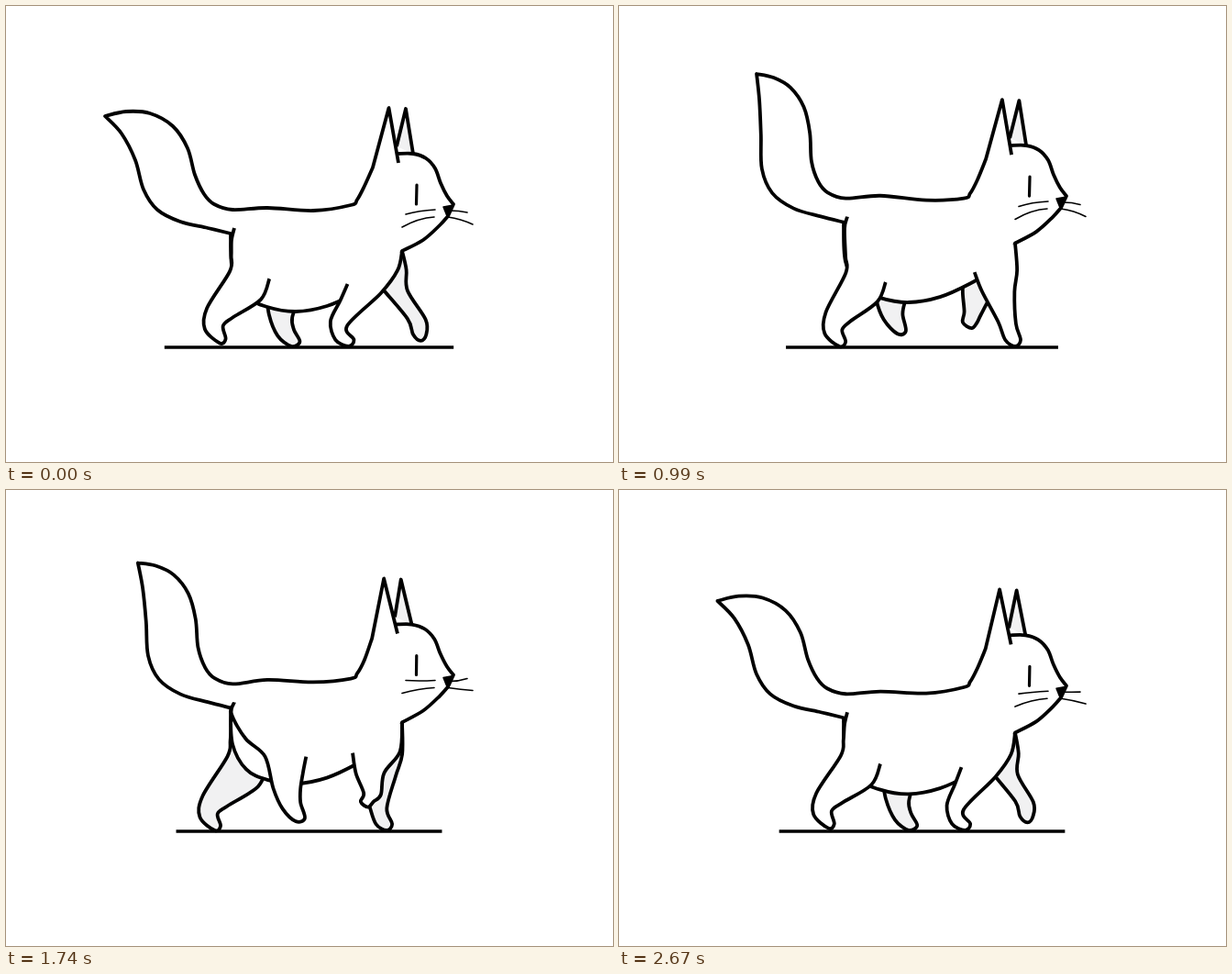
These frames come from a looping animation (662x497 px, 2700 ms). An HTML page with a canvas:

```html
<!DOCTYPE html>
<html lang="en">
<head>
<meta charset="utf-8">
<title>Walking cat</title>
<style>
html, body { margin: 0; width: 100%; height: 100%; overflow: hidden; background: #fff; }
canvas { display: block; }
</style>
</head>
<body>
<canvas id="stage" width="662" height="497"></canvas>
<script>
const ctx = document.getElementById('stage').getContext('2d');
const STRIDE = 1350, BOB = STRIDE / 2, FAR = '#f1f1f2';
const { sin, cos, PI, max, min, hypot } = Math;

const pairs = (...flat) => flat.flatMap((x, i) => i % 2 ? [] : [[x, flat[i + 1]]]);

// The cat as it stands at time zero.
const ROOT = [245, 248];
const spine = pairs(391, 196, 383, 211, 376, 217, 335, 223, 285, 220);
const tailTop = pairs(247, 222, 227, 216, 216, 205, 206, 184, 198, 155, 182, 131, 157, 117, 131, 115, 108, 120);
const tailUnder = pairs(126, 139, 141, 168, 150, 200, 165, 222, 190, 235, 220, 242, ...ROOT);
const belly = pairs(247, 288, 262, 316, 285, 328, 316, 333, 350, 327, 383, 312, 410, 295, 426, 283, 432, 267);
const nearEar = pairs(428, 171, 417.5, 111, 400, 176);
const farEar = pairs(426, 153, 436, 112, 444, 161);
const chin = pairs(455, 255, 473, 239, 482, 229);
const face = pairs(488, 216, 481, 207, 474, 193, 468, 177, 458, 166, 444, 161, 427, 161);
const eye = pairs(448, 195, 447.5, 216);
const nose = pairs(477, 219, 488, 217, 481, 229);
const whiskers = [
  pairs(468, 222, 450, 223, 436, 227), pairs(467, 230, 450, 231, 432, 241),
  pairs(484, 223, 494, 223, 503, 225), pairs(482, 230, 496, 232, 509, 238)
];

// Each leg point: x, y, then its travel (x, y) with the stride and with the lift.
const hind = {
  stride: t => cos(turn(t - 515, STRIDE)),
  lift: t => swing(t - 250),
  points: [
    [253, 273, 10, 0, 0, -3],
    [262, 292, 24.5, 2, 0, -5],
    [253, 335, 46, 2, 0, -18],
    [256.5, 358, 54, 2, 0, -19],
    [272, 371, 53, 0, 0, -15],
    [280, 366, 55, 0, 0, -13],
    [275, 353, 53, 0, 3, -19],
    [279, 342, 45, -3, 7, -21],
    [299, 320, 29, -4, 1, -13],
    [306, 301, 25.5, 0, 0, -16]
  ]
};
const fore = {
  stride: t => {
    const a = turn(t - 790, STRIDE);
    return 0.92 * cos(a) + 0.12 * cos(2 * a) + 0.08 * cos(3 * a);
  },
  lift: t => swing(t - 425),
  points: [
    [382, 295, 13, -11, 0, -12],
    [384, 315, 27, -9, 6, -9],
    [391, 344, 51, 0, 15, -14],
    [398, 364, 53, 0, 5, -25],
    [410, 371, 50, 0, 0, -26],
    [416, 364, 50, 0, 0, -25],
    [410, 347, 52, -2, 15, -16],
    [423, 312, 19, -1, -5, -4],
    [431.5, 288, 6, 0, 0, -3]
  ]
};

const turn = (t, period) => 2 * PI * t / period;
const swing = t => ((1 + cos(turn(t, STRIDE))) / 2) ** 4;
const shift = ([x, y], dx, dy) => [x + dx, y + dy];
const lerp = (a, b, u) => a + (b - a) * u;

// Bobbing wave, zero at time zero and highest at the given moment.
const wave = (t, peak) => cos(turn(t - peak, BOB)) - cos(turn(peak, BOB));

function legPoints(leg, t) {
  const s = leg.stride(t), l = leg.lift(t);
  return leg.points.map(([x, y, sx, sy, lx, ly]) => [x + sx * s + lx * l, y + sy * s + ly * l]);
}

// The bob travels forward along the body and grows towards the chest.
function ride(points, t, right, peaks, sizes) {
  return points.map(([x, y]) => {
    const u = max(0, min(1, (x - ROOT[0]) / (right - ROOT[0])));
    return [x, y + lerp(...sizes, u) * wave(t, lerp(...peaks, u))];
  });
}

const rootDrop = t => 6.3 * wave(t, -30);

// The tail bends more the farther it is from its root.
function bendTail(points, t) {
  return points.map(p => {
    const [x, y] = shift(p, -ROOT[0], -ROOT[1]);
    const a = 0.146 * wave(t, 310) * (hypot(x, y) / 187) ** 1.7;
    return [ROOT[0] + x * cos(a) - y * sin(a), ROOT[1] + x * sin(a) + y * cos(a) + rootDrop(t)];
  });
}

// The head nods and leans, most of all at the ear tips.
function nod(points, t) {
  return points.map(([x, y]) => [
    x + 8.5 * wave(t, 160) * (max(0, 217 - y) / 105) ** 2,
    y + 10.5 * wave(t, 110)
  ]);
}

function smooth(points) {
  const p = i => points[max(0, min(points.length - 1, i))];
  for (let i = 0; i < points.length - 1; i++) {
    const [a, b, c, d] = [p(i - 1), p(i), p(i + 1), p(i + 2)];
    ctx.bezierCurveTo(
      b[0] + (c[0] - a[0]) / 6, b[1] + (c[1] - a[1]) / 6,
      c[0] - (d[0] - b[0]) / 6, c[1] - (d[1] - b[1]) / 6, ...c);
  }
}

const polyline = points => points.forEach(p => ctx.lineTo(...p));

function shape(width, fill, trace) {
  ctx.beginPath();
  trace();
  ctx.lineWidth = width;
  if (fill) {
    ctx.fillStyle = fill;
    ctx.fill();
  }
  ctx.stroke();
}

function drawLegs(t, rump, chest, fill) {
  const outlines = [
    [shift(rump, 4, -6), shift(rump, 1, 7), ...legPoints(hind, t)],
    [...legPoints(fore, t), chest]
  ];
  for (const outline of outlines) {
    shape(3.8, fill, () => {
      ctx.moveTo(...outline[0]);
      smooth(outline);
    });
  }
}

function draw(t) {
  const back = ride(spine, t, 380, [-30, 110], [6.3, 8]);
  const under = ride(belly, t, 432, [60, 110], [6, 10]);
  const top = bendTail(tailTop, t), bottom = bendTail(tailUnder, t);
  const ear = nod(nearEar, t), brow = nod(face, t);
  const rump = bottom.at(-1), chest = under.at(-1);

  ctx.fillStyle = '#fff';
  ctx.fillRect(0, 0, 662, 497);
  ctx.strokeStyle = '#000';
  ctx.lineJoin = 'round';
  ctx.lineCap = 'butt';

  const ground = 152.4 + 7.9 * cos(turn(t - 90, BOB));
  shape(3.5, null, () => polyline([[330.5 - ground, 372], [330.5 + ground, 372]]));

  drawLegs(t + BOB, rump, chest, FAR);
  shape(3.8, FAR, () => polyline(nod(farEar, t)));
  shape(3.8, '#fff', () => {
    polyline(ear);
    smooth([ear.at(-1), ...back, ...top]);
    smooth([top.at(-1), ...bottom]);
    smooth([rump, ...under]);
    smooth([chest, ...nod(chin, t)]);
    ctx.lineTo(...brow[0]);
    smooth(brow);
  });
  drawLegs(t, rump, chest, '#fff');

  shape(1.5, '#000', () => {
    polyline(nod(nose, t));
    ctx.closePath();
  });
  ctx.lineCap = 'round';
  shape(3.2, null, () => polyline(nod(eye, t)));
  for (const whisker of whiskers) {
    const [from, bend, tip] = nod(whisker, t);
    shape(1.6, null, () => {
      ctx.moveTo(...from);
      ctx.quadraticCurveTo(...bend, ...shift(tip, 0, 8 * wave(t, 160)));
    });
  }
}

const start = performance.now();
function frame() {
  const elapsed = performance.now() - start;
  draw(Math.floor(elapsed / 30) * 30 % (2 * STRIDE));
  requestAnimationFrame(frame);
}
frame();
</script>
</body>
</html>
```
